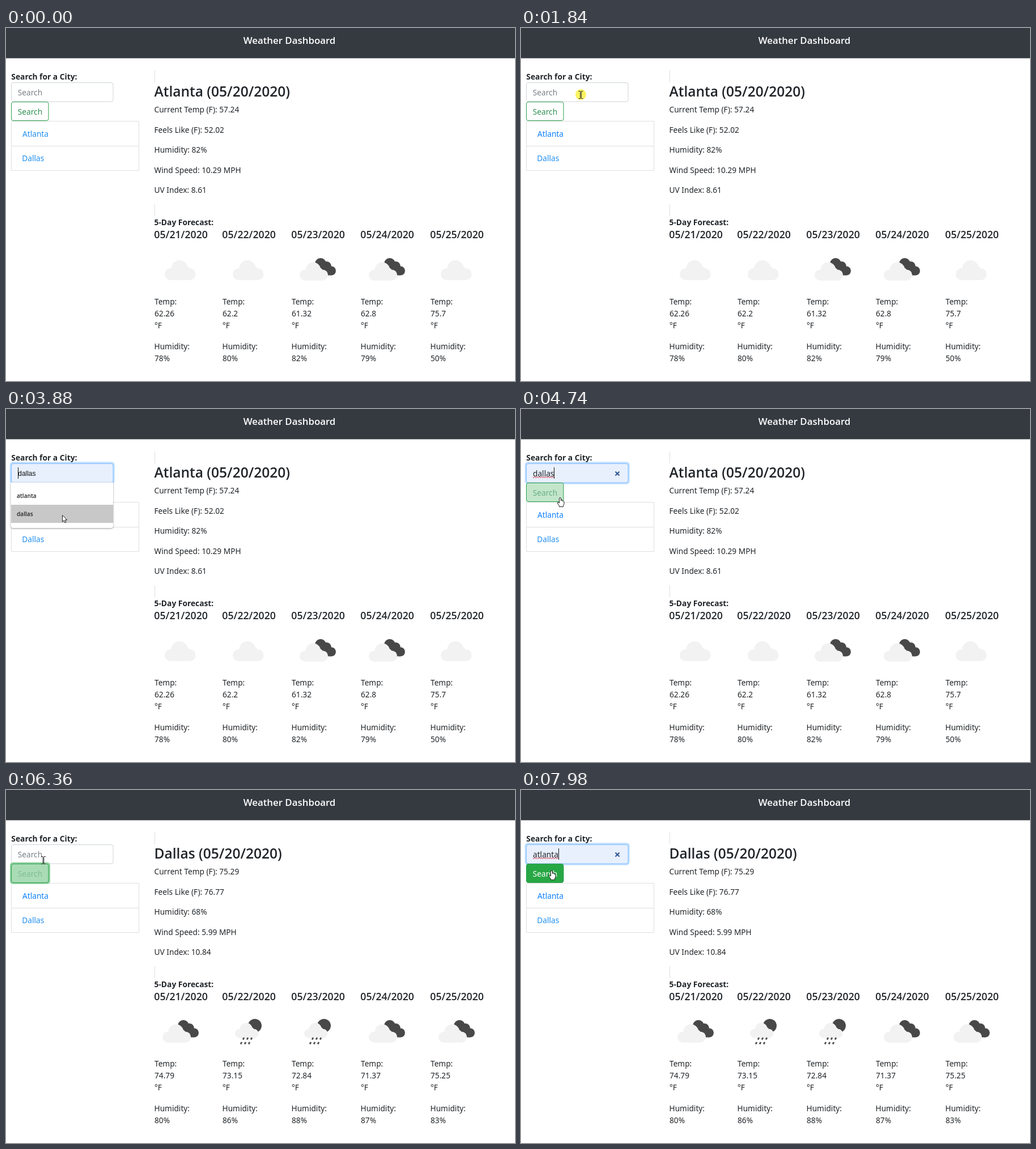
An HTML page with a canvas that plays this animation: 898x623 px, repeating every 8 s.

```html
<!DOCTYPE html>
<html lang="en">
<head>
<meta charset="utf-8">
<title>Weather Dashboard</title>
<style>
  html, body { margin: 0; width: 100%; height: 100%; overflow: hidden; background: #fff; }
  canvas { display: block; }
</style>
</head>
<body>
<canvas id="stage" width="898" height="623"></canvas>
<script>
const ctx = document.getElementById('stage').getContext('2d');
const LOOP = 8000;

const BODY = '13.7px "Noto Sans", "Open Sans", sans-serif';
const BOLD = 'bold 13.8px "Noto Sans", "Open Sans", sans-serif';
const semi = size => `600 ${size}px "Open Sans", "Noto Sans", sans-serif`;
const INK = '#212529';
const DARK = '#484849';
const COLUMNS = [262, 382, 504, 626, 749];
const ROWS = ['atlanta', 'dallas'];

const ATLANTA = {
  city: 'Atlanta',
  now: ['57.24', '52.02', '82%', '10.29', '8.61'],
  icons: ['cloud', 'cloud', 'broken', 'broken', 'cloud'],
  temps: ['62.26', '62.2', '61.32', '62.8', '75.7'],
  humidity: [78, 80, 82, 79, 50]
};
const DALLAS = {
  city: 'Dallas',
  now: ['75.29', '76.77', '68%', '5.99', '10.84'],
  icons: ['broken', 'rain', 'rain', 'broken', 'broken'],
  temps: ['74.79', '73.15', '72.84', '71.37', '75.25'],
  humidity: [80, 86, 88, 87, 83]
};

// Pointer moves: start, end, number of steps, target x, target y
const MOVES = [
  [380, 530, 3, 480, 470], [850, 1080, 4, 146, 163], [1310, 1470, 3, 112, 126],
  [1620, 1760, 3, 105.5, 118], [3490, 3490, 1, 105, 126], [3560, 3880, 5, 99, 187],
  [4660, 4740, 2, 69, 157], [4820, 4970, 3, 53, 144], [6210, 6360, 3, 66, 124],
  [6440, 6510, 2, 70, 116], [7060, 7220, 3, 70.5, 145.5], [7750, 7980, 4, 54, 143]
];
const CLICKS = [[1840, 1990], [4110, 4190], [5130, 5280], [6740, 6910], [7370, 7520]];

// Stepped tracks: [time, value]
const HOVER = [[0, 0], [4740, .28], [4820, .85], [4890, 1], [6280, .8], [6360, .4],
  [6440, .08], [6510, 0], [7520, .3], [7600, 1]];
const GLOW = [[0, 0], [1930, .5], [1990, 1], [5210, 0], [6830, .5], [6910, 1]];
const RING = [[0, false], [5210, true], [6830, false]];
const OPEN = [[0, false], [1990, true], [4190, false], [6990, true], [7520, false]];
const VALUE = [[0, ''], [4190, 'dallas'], [5280, ''], [7520, 'atlanta']];
const CARET = [[0, false], [1930, true], [2390, false], [2940, true], [3490, false],
  [3640, true], [4890, false], [6830, true]];
const CURRENT = [[0, ATLANTA], [5280, null], [5580, DALLAS]];
const FORECAST = [[0, ATLANTA], [5430, DALLAS]];

const at = (track, t) => track.filter(key => key[0] <= t).pop()[1];
const within = (spans, t) => spans.some(([a, b]) => t >= a && t < b);

function pointerAt(t) {
  let x = 809, y = 610;
  for (const [start, end, steps, tx, ty] of MOVES) {
    if (t < start) break;
    const gap = (end - start) / Math.max(1, steps - 1) || 1;
    const done = Math.min(steps, Math.floor((t - start + 6) / gap) + 1);
    x += (tx - x) * done / steps;
    y += (ty - y) * done / steps;
  }
  return { x, y };
}

function text(str, x, y, font = BODY, color = INK) {
  ctx.font = font;
  ctx.fillStyle = color;
  ctx.fillText(str, x, y);
}

function box(x, y, w, h, radius, fill, stroke) {
  ctx.beginPath();
  ctx.roundRect(x, y, w, h, radius);
  if (fill) { ctx.fillStyle = fill; ctx.fill(); }
  if (stroke) { ctx.strokeStyle = stroke; ctx.lineWidth = 1; ctx.stroke(); }
}

function rect(x, y, w, h, color) {
  ctx.fillStyle = color;
  ctx.fillRect(x, y, w, h);
}

function disc(x, y, r, color) {
  ctx.fillStyle = color;
  ctx.beginPath();
  ctx.arc(x, y, r, 0, 7);
  ctx.fill();
}

function polyline(points, color, width) {
  ctx.beginPath();
  points.forEach(([x, y]) => ctx.lineTo(x, y));
  ctx.strokeStyle = color;
  ctx.lineWidth = width;
  ctx.stroke();
}

function mix(a, b, k) {
  return `rgb(${a.map((v, i) => Math.round(v + (b[i] - v) * k))})`;
}

// Weather icons
function cloud(x, y, scale = 1) {
  const c = '#f2f2f2';
  ctx.save();
  ctx.translate(x, y);
  ctx.scale(scale, scale);
  disc(10.5, 24.5, 10.5, c);
  disc(26, 14.5, 14.5, c);
  disc(36.5, 18.5, 8.5, c);
  disc(44, 24.5, 10.5, c);
  rect(10.5, 20, 33.5, 15, c);
  ctx.restore();
}

const ICONS = {
  cloud: x => cloud(x + 18, 410),
  broken(x) {
    disc(x + 51, 416, 10, DARK);
    disc(x + 61.5, 420.5, 8.5, DARK);
    disc(x + 70, 428.5, 8, DARK);
    rect(x + 52, 422, 18, 14.5, DARK);
    cloud(x + 14, 413.5, .92);
  },
  rain(x) {
    disc(x + 57, 416, 12, DARK);
    cloud(x + 22, 411, .76);
    for (let i = 0; i < 6; i++) {
      const low = i > 2;
      const px = x + 37 + (i % 3) * 7 - (low ? 4 : 0);
      const py = low ? 445 : 437;
      polyline([[px + 1, py], [px - 1, py + 3.5]], '#505052', 2.8);
    }
  }
};

function header() {
  rect(0, 0, 898, 53.4, '#343a40');
  ctx.textAlign = 'center';
  text('Weather Dashboard', 500, 28, semi(16.85), '#fff');
  ctx.textAlign = 'left';
}

function currentWeather(data) {
  rect(262, 75, 1, 21, '#dfdfdf');
  rect(262, 311, 1, 21, '#dfdfdf');
  if (!data) return;
  const [temp, feels, humidity, wind, uv] = data.now;
  text(`${data.city} (05/20/2020)`, 261.5, 121, semi(24.55));
  [`Current Temp (F): ${temp}`, `Feels Like (F): ${feels}`, `Humidity: ${humidity}`,
    `Wind Speed: ${wind} MPH`, `UV Index: ${uv}`]
    .forEach((line, i) => text(line, 261.5, Math.round(149 + i * 35.5)));
}

function forecast(data) {
  text('5-Day Forecast:', 261.5, 348, BOLD);
  COLUMNS.forEach((x, i) => {
    text(`05/${21 + i}/2020`, x - .7, 371, semi(17.7));
    ICONS[data.icons[i]](x);
    text('Temp:', x, 488);
    text(data.temps[i], x, 509);
    text('°F', x, 530);
    text('Humidity:', x - .5, 566.5);
    text(`${data.humidity[i]}%`, x, 587.5);
  });
}

function cityList(t) {
  box(9.5, 164.5, 225, 87, 0, '#fff', '#dfdfdf');
  rect(10, 208, 224, 1, '#dfdfdf');
  text('Atlanta', 29, 192, BODY, t < 1000 ? '#1f8ff0' : '#0a7fff');
  text('Dallas', 28.3, 235, BODY, '#1f8ff0');
}

function button(hover, ring) {
  const green = [40, 167, 69], white = [255, 255, 255];
  if (ring) box(7, 127.5, 71, 38.5, 5.5, '#93d3a2');
  box(9.5, 130.5, 65.5, 33, 3.5, mix(white, green, hover), '#2b9f4d');
  text('Search', 20.8, 153, BODY, mix([46, 143, 82], white, hover));
}

function field(value, preview, glow, caret) {
  const filled = value || preview;
  if (glow) box(6.7, 93.2, 185, 39.6, 5.5, `rgba(0,123,255,${.25 * glow})`);
  box(9.5, 96.5, 179.5, 33.5, 3.5, filled ? '#e8f0fe' : '#fff', glow ? '#80bdff' : '#ced4da');

  let end = 21;
  if (value) {
    text(value, 21, 118.5);
    end = Math.round(21 + ctx.measureText(value).width);
    const wave = [];
    for (let x = 21; x <= end; x++) wave.push([x, 120.5 + (x % 4 < 2 ? -.7 : .7)]);
    polyline(wave, '#e0424a', 1);
    polyline([[166.5, 110.5], [173.5, 117.5]], '#2f5597', 2);
    polyline([[173.5, 110.5], [166.5, 117.5]], '#2f5597', 2);
  } else if (preview) {
    text(preview, 21.3, 118, '11.9px "Liberation Sans", Arial, sans-serif', '#111');
  } else {
    text('Search', 20.8, 118.5, BODY, '#7a8087');
  }
  if (caret) rect(end, 103, 1, 20, '#111');
}

function dropdown(row) {
  ctx.save();
  ctx.shadowColor = 'rgba(0,0,0,.4)';
  ctx.shadowBlur = 3;
  ctx.shadowOffsetY = 1;
  box(8.5, 129.5, 180.5, 80.5, [0, 0, 4, 4], '#fff');
  ctx.restore();
  if (row >= 0) rect(9, 137, 180, 32, '#fff'), rect(9, 137 + row * 32, 180, 32, '#c8c8c8');
  ROWS.forEach((name, i) => text(name, 19, 157 + i * 32, semi(10.1), '#222'));
}

// Pointer shapes
const ARROW = new Path2D('M.5 .5V12L3.2 9.5 5 13.7 6.9 12.9 5.1 8.8H9Z');
const HAND = new Path2D('M-1.5 9V1Q-1.4-.6 0-.6T1.5 1V5Q3-.0 4 5.2 5.5 4.4 6 6 7.2 5.6 7 8V11L5.5 13V15.5H-1.5V14L-5 9Q-4.6 7-3 8Z');
const BEAM = new Path2D('M-4-6.5H-1L0-5.5 1-6.5H4M-4 6.5H-1L0 5.5 1 6.5H4M-.8-5.5V5.5M.8-5.5V5.5');

function pointer({ x, y }, shape) {
  ctx.save();
  ctx.translate(x, y);
  ctx.lineWidth = 1;
  ctx.strokeStyle = '#222';
  if (shape !== BEAM) {
    ctx.fillStyle = '#fff';
    ctx.fill(shape);
  }
  ctx.stroke(shape);
  ctx.restore();
}

function draw(t) {
  const p = pointerAt(t);
  const open = at(OPEN, t);
  const row = open && p.y >= 137 ? (p.y < 169 ? 0 : 1) : -1;

  rect(0, 0, 898, 623, '#fff');
  header();
  currentWeather(at(CURRENT, t));
  forecast(at(FORECAST, t));
  text('Search for a City:', 9.3, 91, BOLD);
  cityList(t);
  field(at(VALUE, t), ROWS[row], at(GLOW, t), at(CARET, t) && !at(RING, t));
  button(at(HOVER, t), at(RING, t));
  if (open) dropdown(row);

  if (t < 380) return;
  if (within(CLICKS, t)) disc(p.x, p.y - .5, 9.5, 'rgba(250,238,20,.68)');
  const overField = p.x < 189 && p.y > 96 && p.y < 130;
  const overButton = !open && p.x < 75 && p.y >= 130 && p.y < 164;
  pointer(p, overField ? BEAM : overButton ? HAND : ARROW);
}

const begin = performance.now();
function tick() {
  draw((performance.now() - begin) % LOOP);
  requestAnimationFrame(tick);
}
tick();
</script>
</body>
</html>
```
